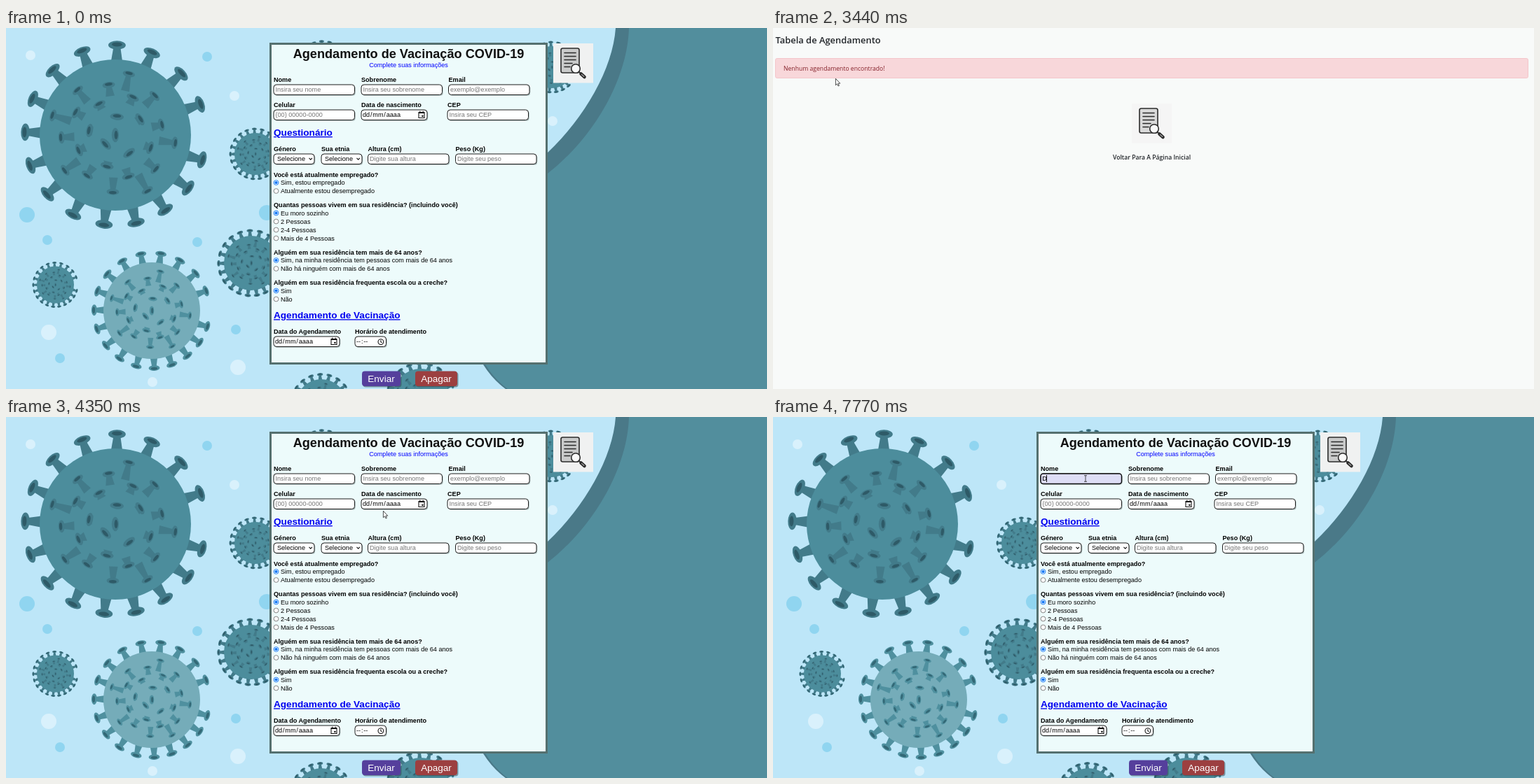
Animation, 1086 px wide and 516 px high, one loop 8 s. Source, as an HTML page:

```html
<!DOCTYPE html>
<html lang="pt">
<head>
<meta charset="utf-8">
<title>Agendamento</title>
<style>
html, body { margin: 0; width: 100%; height: 100%; overflow: hidden; background: #528e9d; }
svg { display: block; width: 100%; height: 100%; }
text { font-family: "Liberation Sans", Arial, sans-serif; font-size: 9.1px; white-space: pre; }
.b { font-weight: 700; }
.mid { text-anchor: middle; }
.hint { fill: #757575; }
.title { font-size: 18.15px; font-weight: 700; fill: #111; }
.sub { fill: #0000ff; }
.head { font-size: 13.6px; font-weight: 700; fill: #0000f0; text-decoration: underline; }
.btn { font-size: 13.57px; fill: #fff; }
.ui { font-family: "Open Sans", "Noto Sans", sans-serif; font-size: 8.65px; fill: #212529; }
.alert { fill: #842029; }
.semi { font-weight: 600; }
.large { font-size: 12.9px; }
.line { fill: none; stroke: #111; stroke-width: 1.1; }
.pointer path { fill: #fff; stroke: #222; stroke-width: .8; }
</style>
</head>
<body>
<svg id="stage" viewBox="0 0 1086 516"></svg>
<script>
const LOOP = 8000;
const stage = document.getElementById('stage');
const range = (n, f) => Array.from({ length: n }, (_, i) => f(i)).join('');

const txt = (x, y, s, cls = '') => `<text x="${x}" y="${y}" class="${cls}">${s}</text>`;
const rect = (x, y, w, h, more) => `<rect x="${x}" y="${y}" width="${w}" height="${h}" ${more}/>`;
const disc = (x, y, r, fill) => `<circle cx="${x}" cy="${y}" r="${r}" fill="${fill}"/>`;
const oval = (x, y, rx, ry, fill) => `<ellipse cx="${x}" cy="${y}" rx="${rx}" ry="${ry}" fill="${fill}"/>`;
const line = d => `<path class="line" d="${d}"/>`;

// ---------- backdrop ----------
const TEAL = { body: '#4c8d9c', spike: '#427b8a', core: '#2e5a67' };
const PALE = { body: '#75acb9', spike: '#4f909f', core: '#336876' };

function spike(angle, from, to, size, c) {
  return `<g transform="rotate(${angle})">`
    + `<path d="M${from} ${-size * .7}L${to} ${-size * .36}V${size * .36}L${from} ${size * .7}Z" fill="${c.spike}"/>`
    + oval(to, 0, size * .5, size, c.spike) + oval(to + 1, 0, size * .24, size * .6, c.core) + '</g>';
}

// Rim spikes go round with one wider gap; those facing the viewer follow the golden angle.
function virus(x, y, r, rim = 20, c = TEAL) {
  const last = rim - 1, inner = 26;
  return `<g transform="translate(${x} ${y}) scale(${r / 100})">`
    + range(rim, i => spike(16 + 324 * i / last - 7 * Math.sin(Math.PI * i / last), 94, 119, 11.5, c))
    + disc(0, 0, 100, c.body)
    + range(inner, i => {
      const far = 88 * Math.sqrt(i / inner);
      return spike(i * 137.5, far * (1 - far / 300), far, 9.5 - far / 60, c);
    }) + '</g>';
}

function bubbles() {
  const spots = [[61, 435], [35, 39], [326, 97], [209, 506], [331, 485], [780, 133],
    [287, 41], [59, 303], [30, 267], [273, 306], [328, 431], [77, 472], [372, 264]];
  return spots.map(([x, y], i) => disc(x, y, i % 4 ? 7 : 11, i < 6 ? '#d9f1fc' : '#90d5f0')).join('');
}

const backdrop = () => rect(0, 0, 1086, 516, 'fill="#528e9d"')
  + '<path d="M0 0H889C887 72 840 156 773 208C690 270 640 390 684 481Q697 502 716 516H0Z" fill="#4a7988"/>'
  + '<path d="M0 0H870C866 58 826 128 773 178C690 250 640 380 681 481Q694 502 713 516H0Z" fill="#bde6f8"/>'
  + bubbles()
  + virus(156, 153, 108, 16) + virus(208, 404, 69, 18, PALE)
  + virus(356, 180, 30) + virus(350, 336, 39) + virus(70.5, 367, 26.5)
  + virus(452, 56, 31) + virus(779, 56, 30) + virus(450, 538, 36) + virus(592, 527, 40);

// ---------- form ----------
const box = (x, y, w) => rect(x + 1.2, y + 1.2, w, 14.5, 'rx="4" fill="#8fa0a0" opacity=".7"')
  + rect(x, y, w, 14.5, 'rx="4" fill="#fff" stroke="#1c1c1c"');

const spaced = parts => parts.map((p, i) => i ? `<tspan dx=".85">${p}</tspan>` : p).join('');

// Each kind of field: width and what stands inside the box.
const input = hint => [115.5, (x, y) => txt(x + 2.5, y + 10.3, hint, 'hint')];

const select = [58, (x, y) => txt(x + 5, y + 10.4, 'Selecione') + line(`M${x + 50.5} ${y + 5.8}l2.2 2.4l2.2 -2.4`)];

const date = [94, (x, y) => txt(x + 2, y + 10.4, spaced(['dd', '/', 'mm', '/', 'aaaa']))
  + line(`M${x + 82} ${y + 3.5}h8v8h-8zm0 1h8m-6.2 -1.5v-1.2m4.4 1.2v-1.2`)
  + rect(x + 86.3, y + 7.8, 2.2, 2.2, 'fill="#111"')];

const time = [44.5, (x, y) => txt(x + 2, y + 10.2, spaced(['--', ':', '--']))
  + line(`M${x + 33} ${y + 7.6}a3.9 3.9 0 1 1 7.8 0a3.9 3.9 0 1 1 -7.8 0M${x + 36.9} ${y + 5.2}v2.6l1.8 1.1`)];

function field(x, y, label, [w, inside]) {
  return txt(x, y - 4.4, label, 'b') + box(x, y, w) + inside(x, y);
}

function radio(y, label, on) {
  const tone = on ? '#0b74f5' : '#767676';
  return `<circle cx="385.5" cy="${y}" r="3.4" fill="#fff" stroke="${tone}" stroke-width=".9"/>`
    + (on ? disc(385.5, y, 2.1, tone) : '') + txt(392, y + 3.4, label);
}

function questions(y, list) {
  return list.map(([title, ...options]) => {
    const part = txt(382, y, title, 'b') + options.map((o, i) => radio(y + 8.4 + 12 * i, o, !i)).join('');
    y += 19.5 + 12 * options.length;
    return part;
  }).join('');
}

const button = (x, w, fill, label) => rect(x + 1.5, 492, w, 21.5, 'rx="4" fill="#30484f" opacity=".5"')
  + rect(x, 490.5, w, 21.5, `rx="4" fill="${fill}"`) + txt(x + w / 2, 506, label, 'btn mid');

const icon = (x, y, back, paper) => `<g transform="translate(${x} ${y})" stroke="#2b2b2b" stroke-width="1.6" stroke-linecap="round">`
  + rect(0, 0, 57, 56.5, `fill="${back}" stroke="none"`)
  + rect(11, 7, 26, 35, `rx="2.5" fill="${paper}"`)
  + range(5, i => `<path d="M16 ${13.5 + 5 * i}h${[16, 16, 16, 11, 8][i]}"/>`)
  + '<path d="M36 40L39 43"/><path d="M39.5 43.5L44.5 48" stroke-width="4.6"/>'
  + '<path d="M40.5 44.4L43.8 47.3" stroke="#aaa" stroke-width="1.2"/>'
  + '<circle cx="32" cy="36" r="6.3" fill="#fafafa"/></g>';

const form = () => rect(377.5, 22.5, 394, 457, 'fill="#edfbfb" stroke="#55706f" stroke-width="3"')
  + txt(574.5, 43, 'Agendamento de Vacinação COVID-19', 'title mid')
  + txt(574.5, 55.8, 'Complete suas informações', 'sub mid')
  + field(382, 81, 'Nome', input('Insira seu nome'))
  + field(507, 81, 'Sobrenome', input('Insira seu sobrenome'))
  + field(631.5, 81, 'Email', input('exemplo@exemplo'))
  + field(382, 117, 'Celular', input('(00) 00000-0000'))
  + field(507, 117, 'Data de nascimento', date)
  + field(630, 117, 'CEP', input('Insira seu CEP'))
  + txt(382, 154, 'Questionário', 'head')
  + field(382, 180, 'Género', select)
  + field(450, 180, 'Sua etnia', select)
  + field(516.5, 180, 'Altura (cm)', input('Digite sua altura'))
  + field(641.5, 180, 'Peso (Kg)', input('Digite seu peso'))
  + questions(212.6, [
    ['Você está atualmente empregado?', 'Sim, estou empregado', 'Atualmente estou desempregado'],
    ['Quantas pessoas vivem em sua residência? (incluindo você)', 'Eu moro sozinho', '2 Pessoas', '2-4 Pessoas', 'Mais de 4 Pessoas'],
    ['Alguém em sua residência tem mais de 64 anos?', 'Sim, na minha residência tem pessoas com mais de 64 anos', 'Não há ninguém com mais de 64 anos'],
    ['Alguém em sua residência frequenta escola ou a creche?', 'Sim', 'Não']
  ])
  + txt(382, 415.2, 'Agendamento de Vacinação', 'head')
  + field(382, 441, 'Data do Agendamento', date)
  + field(498, 441, 'Horário de atendimento', time)
  + button(508, 55, '#553f9c', 'Enviar') + button(584, 60, '#9c3f40', 'Apagar')
  + icon(781, 22, '#f0f1f1', '#c9caca');

const focused = () => rect(382, 81, 115.5, 14.5, 'rx="3.5" fill="#dedef6" stroke="#101010" stroke-width="1.5"')
  + `<g id="hint">${txt(384.5, 91.3, 'Insira seu nome', 'hint')}</g><g id="typed">${txt(384.3, 91.3, 'D')}</g>`
  + rect(384, 83, 1, 10, 'id="caret" fill="#111"');

const table = () => rect(0, 0, 1086, 516, 'fill="#f8faf9"')
  + txt(3.5, 22, 'Tabela de Agendamento', 'ui semi large')
  + rect(3.5, 43.5, 1074, 28, 'rx="2.3" fill="#f8d7da" stroke="#f4c6ca"')
  + txt(15, 61, 'Nenhum agendamento encontrado!', 'ui alert')
  + icon(512, 108, '#f5f5f5', '#d9d9d9')
  + txt(540.5, 188, 'Voltar Para A Página Inicial', 'ui semi mid');

const pointers = '<path id="arrow" d="M.4 .3V9.8L2.5 7.8L4 11L5.4 10.4L4 7.2H6.8Z"/>'
  + '<path id="hand" d="M-1 .8Q0 -.4 1 .8V4.2L5.2 5Q6.5 5.3 6.4 6.7L5.6 10.2V12.3H-.6V10.8L-3.3 7Q-3.3 5.6 -2 6L-1 7Z"/>'
  + '<path id="beam" d="M-2 -4.3H2M0 -4.3V4.3M-2 4.3H2"/>';

stage.innerHTML = `<g id="form">${backdrop()}${form()}<g id="focus">${focused()}</g></g><g id="table">${table()}</g>`
  + rect(0, 0, 1086, 516, 'id="blank" fill="#35363a"') + `<g id="cursor" class="pointer">${pointers}</g>`;

// ---------- pointer: each move bends from the last stop past `via` to `to` ----------
const STEP = 70;
const HOME = [1057, 500];
const MOVES = [
  { at: 330, steps: 12, via: [890, 200], to: [844, 72] },
  { at: 1170, steps: 4, via: [834, 55], to: [837, 66] },
  { at: 1520, steps: 1, to: [840, 69] },
  { at: 1910, steps: 12, via: [530, 445], to: [236, 111] },
  { at: 2740, steps: 11, via: [-120, 72], to: [89, 72] },
  { at: 3580, steps: 11, via: [330, 105], to: [533, 132] },
  { at: 4350, steps: 1, to: [538, 134] },
  { at: 4410, steps: 10, via: [530, 280], to: [431, 99] },
  { at: 5230, steps: 8, via: [440, 89], to: [446, 88] }
];

function pointerAt(t) {
  const n = MOVES.filter(m => m.at <= t).length - 1;
  if (n < 0) return null;
  const { at, steps, to, via = to } = MOVES[n];
  const from = n ? MOVES[n - 1].to : HOME;
  const u = Math.min(1, (Math.floor((t - at) / STEP) + 1) / steps);
  return to.map((end, d) => (1 - u) ** 2 * from[d] + 2 * u * (1 - u) * via[d] + u * u * end);
}

// ---------- timeline ----------
const TABLE = 1520, BLANK = 4280, BACK = 4350, FOCUS = 5720, TYPE = 7770;
const BLINK = 530, CARET = 6640;

const part = {};
stage.querySelectorAll('[id]').forEach(e => part[e.id] = e);
const show = (id, on) => part[id].style.display = on ? '' : 'none';
const inside = ([x, y], l, t, w, h) => x > l && x < l + w && y > t && y < t + h;

function draw(t) {
  const onTable = t >= TABLE && t < BLANK;
  const blank = t >= BLANK && t < BACK;
  const onForm = !onTable && !blank;
  const typed = t >= TYPE;
  show('form', onForm);
  show('table', onTable);
  show('blank', blank);
  show('focus', t >= FOCUS);
  show('hint', !typed);
  show('typed', typed);
  show('caret', Math.floor((t - CARET) / BLINK) % 2 === 0);
  part.caret.setAttribute('x', typed ? 390 : 384);

  const p = pointerAt(t);
  show('cursor', p);
  if (!p) return;
  const overIcon = onTable ? inside(p, 512, 108, 57, 57) : onForm && inside(p, 781, 22, 57, 57);
  const overField = onForm && (inside(p, 382, 80, 116, 16) || inside(p, 516, 180, 116, 15));
  show('hand', overIcon);
  show('beam', overField);
  show('arrow', !overIcon && !overField);
  part.cursor.setAttribute('transform', `translate(${p[0].toFixed(1)} ${p[1].toFixed(1)})`);
}

const begin = performance.now();
function tick() {
  draw((performance.now() - begin) % LOOP);
  requestAnimationFrame(tick);
}
tick();
</script>
</body>
</html>
```
